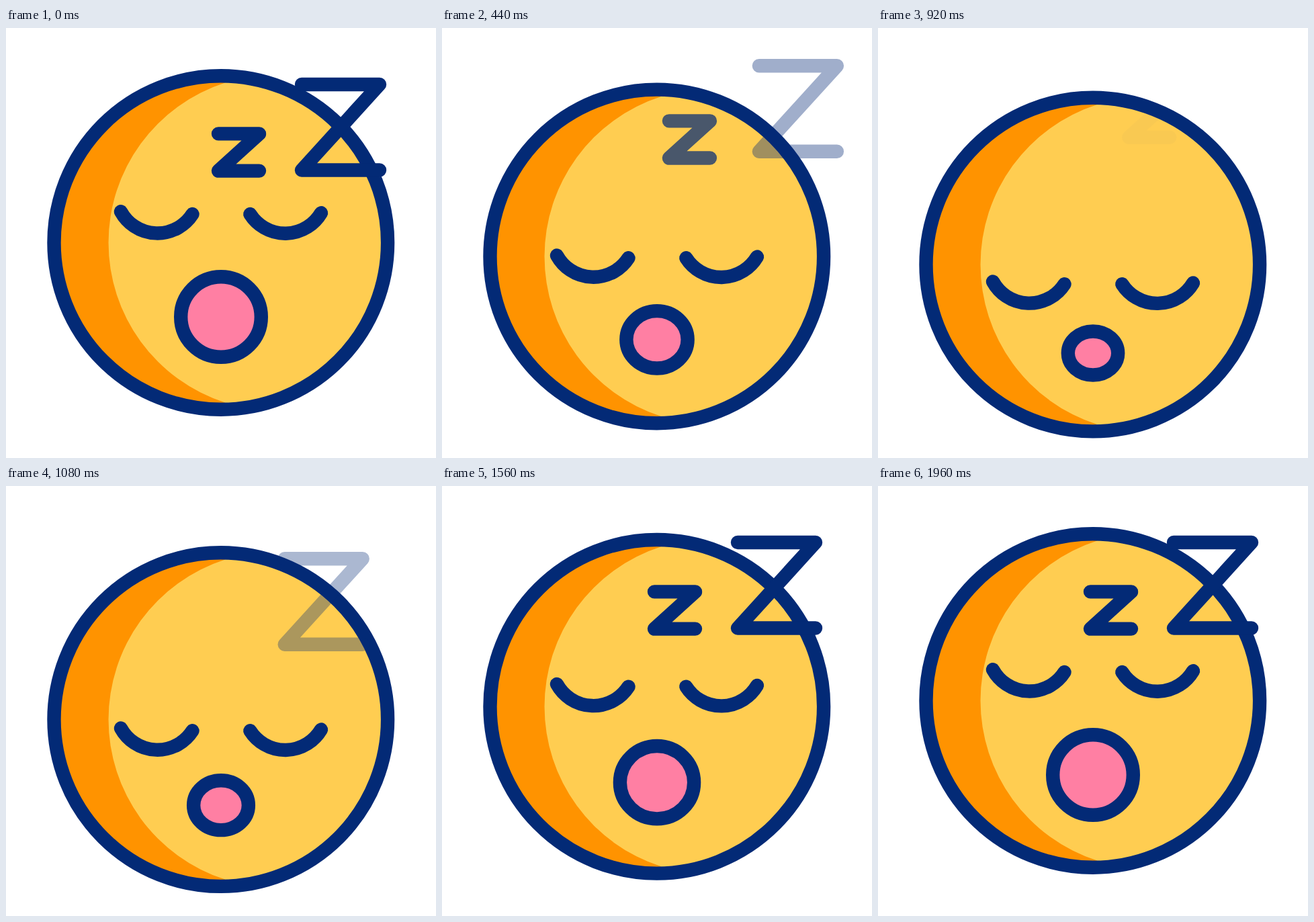
Animation of 640x640 px, one loop 2000 ms. Source, as an HTML page:

```html
<!DOCTYPE html>
<html lang="en">
<head>
<meta charset="utf-8">
<title>Sleeping face</title>
<style>
  html, body { margin: 0; width: 100%; height: 100%; overflow: hidden; background: #fff; }
  svg { display: block; width: 100%; height: 100%; }
  .line { fill: none; stroke: #032a76; stroke-width: 20.4; stroke-linecap: round; stroke-linejoin: round; }
</style>
</head>
<body>
<svg viewBox="0 0 640 640">
  <clipPath id="inFace"><circle id="clip" cx="319.8" cy="319.5" r="258.5"/></clipPath>
  <g id="face">
    <circle cx="319.8" cy="319.5" r="248" fill="#ffcd51"/>
    <path d="M326 81.5A250 250 0 0 0 326 557.5L320 567.5A248 248 0 0 1 320 71.5Z" fill="#ff9300"/>
    <circle class="line" cx="319.8" cy="319.5" r="248.3"/>
  </g>
  <g id="eyes" class="line">
    <path d="M171 273.3A62 62 0 0 0 277.5 277"/>
    <path d="M363.3 277A62 62 0 0 0 469 275.3"/>
  </g>
  <ellipse id="mouth" class="line" cx="320" style="fill:#ff7fa3"/>
  <g clip-path="url(#inFace)">
    <path id="smallZ" class="line" d="M316 157.4H377L316 212.6H377"/>
  </g>
  <path id="bigZ" class="line" d="M440 84H556L440 211.5H556"/>
</svg>
<script>
const LOOP = 2000, STEP = 40;
const $ = id => document.getElementById(id);

const ramp = (t, a, b) => Math.min(1, Math.max(0, (t - a) / (b - a)));
const easeOut = u => u * (2 - u);
// Linear at soft = 0, fully eased in and out at soft = 1.
const ease = (u, soft) => u + soft * (u * u * (3 - 2 * u) - u);

// Sinks until the turn, then rises back to rest.
const breathe = (t, depth, turn, end, softDown, softUp) => depth *
  (t < turn ? ease(t / turn, softDown) : ease(1 - ramp(t, turn, end), softUp));

function move(id, x, y, opacity = 1) {
  $(id).setAttribute('transform', `translate(${x} ${y})`);
  $(id).setAttribute('opacity', opacity);
}

// Each letter drifts off up and right, then returns from below left.
function drift(id, t, out, opacity, enter) {
  if (t < enter) return move(id, out, -.87 * out, opacity);
  const p = ramp(t, enter, enter + 320);
  move(id, -38 * (1 - p), 36.5 * (1 - p), p);
}

function draw(t) {
  const drop = breathe(t, 34.4, 750, 1960, .2, 1);
  const eye = breathe(t, 112.5, 780, 1830, .5, .7);
  move('face', 0, drop);
  move('clip', 0, drop);
  move('eyes', 0, eye);
  const mouth = $('mouth');
  mouth.setAttribute('cy', 430 + .518 * eye);
  mouth.setAttribute('rx', 59.8 - .217 * eye);
  mouth.setAttribute('ry', 59.8 - .262 * eye);
  const leave = ramp(t, 240, 560);
  drift('bigZ', t, 51 * leave, 1 - leave, 973);
  drift('smallZ', t, 58 * easeOut(ramp(t, 290, 1000)), 1 - ramp(t, 250, 935), 1083);
}

function tick() {
  const t = performance.now() % LOOP;
  draw(Math.floor(t / STEP) * STEP);
  requestAnimationFrame(tick);
}
tick();
</script>
</body>
</html>
```
